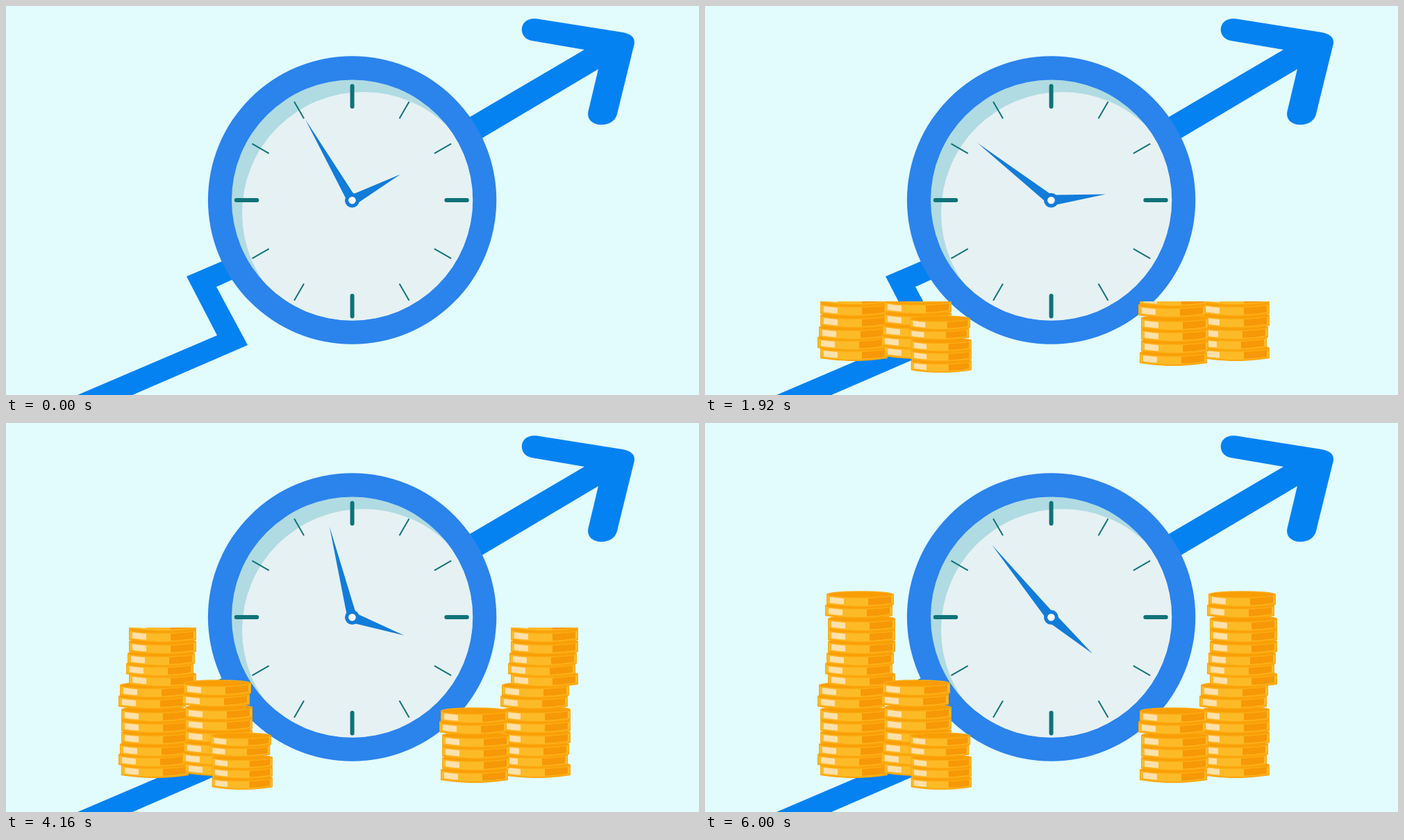
Animation, 998 px wide and 561 px high, one loop 6.08 s. Source, as an HTML page with a canvas:

```html
<!DOCTYPE html>
<html lang="en">
<head>
<meta charset="utf-8">
<title>Time and growth</title>
<style>
html, body { margin: 0; width: 100%; height: 100%; overflow: hidden; background: #e2fbfd; }
canvas { display: block; }
</style>
</head>
<body>
<canvas id="stage" width="998" height="561"></canvas>
<script>
const ctx = document.getElementById('stage').getContext('2d');
const LOOP = 6080, STEP = 80;

// Hand angles in degrees, clockwise from twelve
const times = [0, 1280, 2640, 3520, 4160, 5120, 6000];
const minuteAngles = [330, 552.5, 797.8, 954.5, 1066, 1236.6, 1400.8];
const hourAngles = [61.6, 76.4, 91.8, 102.2, 109.1, 120.3, 131.3];

// Coins of a stack from the top: side shift and height of the middle
const coinX = [2, 0, 4, 4, 4, 2, 0, 4];
const coinY = [14, 30, 49, 65, 82, 99, 114, 129];
const COIN = 97;

// x, top, number of coins, scale
const stacks = [
  [162, 373, 8, 1], [173, 242, 8, 1], [254, 370, 8, 1], [293, 446, 5, 0.9],
  [712, 373, 8, 1], [723, 242, 8, 1], [624, 410, 6, 1]
];

const arrow = new Path2D('M765 18.5L888 38Q906 41 905 54L880 156C875 178 834 176 838.5 152' +
  'L853 91L658 207L640 176.5L833 63L757 50C736 46 738 15 765 18.5Z');
const zigzag = new Path2D('M103 561L304 475L260 390L330 360L345 386L303 405L348 489L182 561Z');

function disc(x, y, r, color) {
  ctx.fillStyle = color;
  ctx.beginPath();
  ctx.arc(x, y, r, 0, 2 * Math.PI);
  ctx.fill();
}

function lerpKeys(values, t) {
  let i = 0;
  while (i < times.length - 2 && t > times[i + 1]) i++;
  const k = (t - times[i]) / (times[i + 1] - times[i]);
  return values[i] + (values[i + 1] - values[i]) * k;
}

// Strip of the coin's side that follows its curve
function band(x1, x2, top, bottom, color) {
  const bulge = x => 4 * (1 - (2 * x / COIN - 1) ** 2);
  ctx.fillStyle = ctx.strokeStyle = color;
  ctx.lineWidth = 2;
  ctx.lineJoin = 'round';
  ctx.beginPath();
  for (let i = 0; i <= 12; i++) {
    const x = x1 + (x2 - x1) * i / 12;
    ctx.lineTo(x, top + bulge(x));
  }
  for (let i = 12; i >= 0; i--) {
    const x = x1 + (x2 - x1) * i / 12;
    ctx.lineTo(x, bottom + bulge(x));
  }
  ctx.closePath();
  ctx.fill();
  ctx.stroke();
}

function coin(x, y) {
  ctx.save();
  ctx.translate(x, y);
  band(1, COIN - 1, -9, 5, '#fca60b');
  band(2, COIN - 2, -7, 3, '#fdba27');
  band(6, 24, -5, 1.5, '#fde0ab');
  band(61, 92, -6, 2, '#f79806');
  ctx.fillStyle = '#f99d05';
  ctx.strokeStyle = '#fcab12';
  ctx.lineWidth = 1.5;
  ctx.beginPath();
  ctx.ellipse(COIN / 2, -8.5, COIN / 2 - 0.7, 4.5, 0, 0, 2 * Math.PI);
  ctx.fill();
  ctx.stroke();
  ctx.restore();
}

function stack([x, y, count, scale]) {
  ctx.save();
  ctx.translate(x, y);
  ctx.scale(scale, scale);
  for (let i = count - 1; i >= 0; i--) coin(coinX[i], coinY[i]);
  ctx.restore();
}

function ticks() {
  ctx.strokeStyle = '#0f7377';
  for (let i = 0; i < 12; i++) {
    const main = i % 3 === 0;
    ctx.save();
    ctx.translate(497.8, main && i % 6 ? 280 : 281.3);
    if (i % 6 === 0) ctx.translate(0.8, 0.3);
    ctx.rotate(i * Math.PI / 6);
    ctx.lineWidth = main ? 6 : 2;
    ctx.lineCap = main ? 'round' : 'butt';
    ctx.beginPath();
    ctx.moveTo(0, main ? -136.5 : -137.5);
    ctx.lineTo(0, main ? -166 : -165.5);
    ctx.stroke();
    ctx.restore();
  }
}

function hand(angle, length, half) {
  ctx.save();
  ctx.translate(498.5, 280.3);
  ctx.rotate(angle * Math.PI / 180);
  ctx.fillStyle = '#117cda';
  ctx.beginPath();
  ctx.moveTo(-half, -7);
  ctx.lineTo(0, -length);
  ctx.lineTo(half, -7);
  ctx.fill();
  ctx.restore();
}

function clock(t) {
  disc(498.6, 280, 207.7, '#2b83ec');
  ctx.save();
  ctx.beginPath();
  ctx.arc(498.6, 280, 173.6, 0, 2 * Math.PI);
  ctx.clip();
  ctx.fillStyle = '#b0dbe2';
  ctx.fillRect(320, 100, 360, 360);
  disc(514.5, 298.5, 174.5, '#e6f1f3');
  ctx.restore();
  ticks();
  hand(lerpKeys(hourAngles, t), 79, 7);
  hand(lerpKeys(minuteAngles, t), 135, 6.5);
  disc(498.5, 280.3, 10.5, '#117cda');
  disc(498.5, 280.3, 5.3, '#fff');
}

function draw(t) {
  ctx.fillStyle = '#e2fbfd';
  ctx.fillRect(0, 0, 998, 561);
  ctx.fillStyle = '#0482f2';
  ctx.fill(arrow);
  ctx.fill(zigzag);
  clock(t);

  // The coins are uncovered from below
  const edge = Math.round(538.3 - 0.0585 * t);
  ctx.save();
  ctx.beginPath();
  ctx.rect(0, edge, 998, 561 - edge);
  ctx.clip();
  stacks.forEach(stack);
  ctx.restore();
}

const start = performance.now();
function frame() {
  const t = (performance.now() - start) % LOOP;
  draw(Math.floor(t / STEP) * STEP);
  requestAnimationFrame(frame);
}
frame();
</script>
</body>
</html>
```
